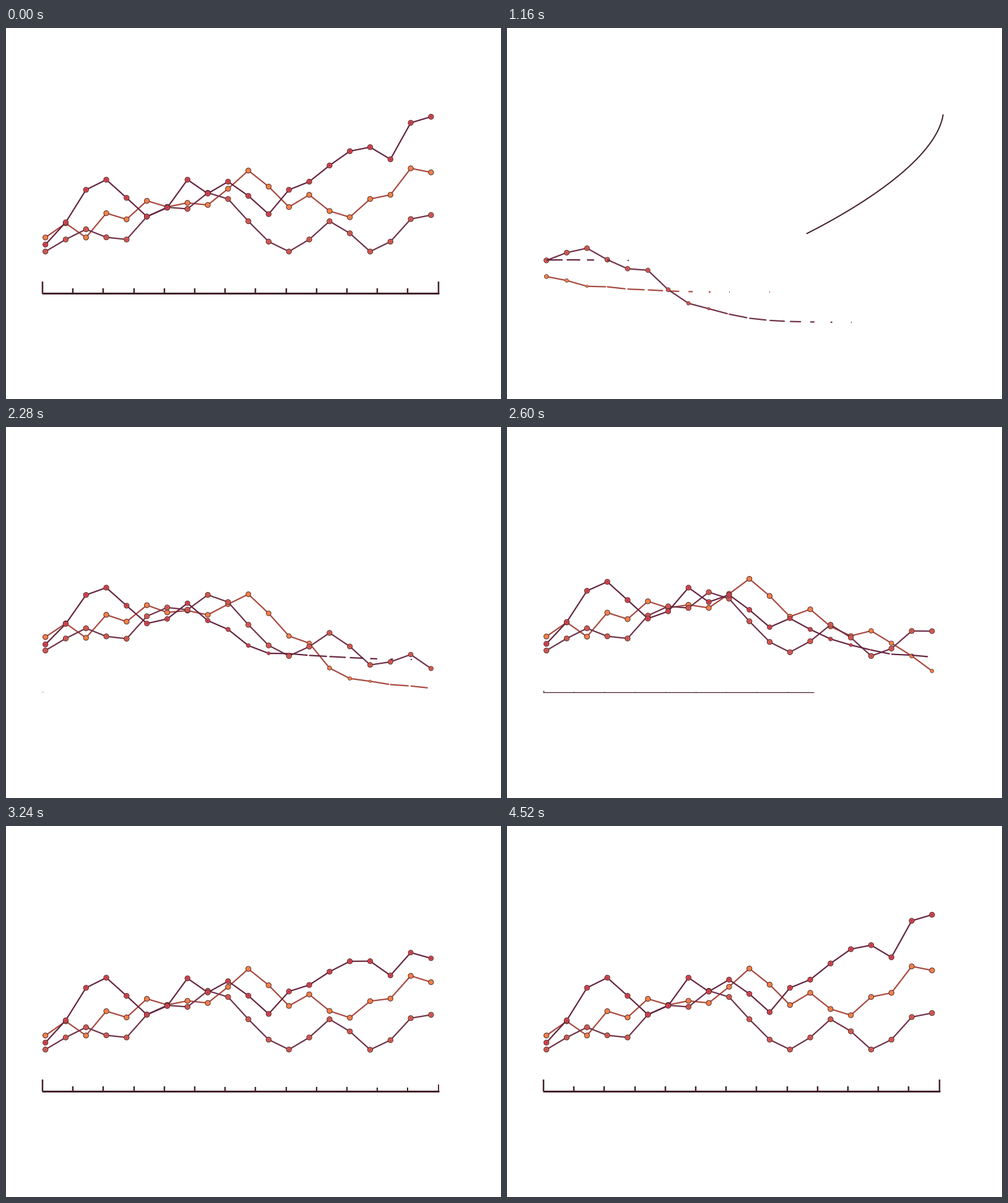
A matplotlib script that plays this animation: 800 px wide and 600 px high, repeating every 5520 ms.

```python
import numpy as np
import matplotlib.pyplot as plt
from matplotlib.animation import FuncAnimation
from matplotlib.collections import LineCollection

W, H, DPI = 800, 600, 100
STEP, FRAMES = 40, 138
PX = 72 / DPI
DARK = "#44222b"

fig = plt.figure(figsize=(W / DPI, H / DPI), dpi=DPI, facecolor="white")
ax = fig.add_axes([0, 0, 1, 1])
ax.set_xlim(0, W)
ax.set_ylim(H, 0)
ax.axis("off")

# Ease curve: cubic bezier (.64, 0, 0, 1)
_s = np.linspace(0, 1, 800)
_ease_x = 1.92 * _s * (1 - _s) ** 2 + _s ** 3
_ease_y = 3 * _s ** 2 - 2 * _s ** 3


def ease(t, start, dur):
    return np.interp((t - start) / dur, _ease_x, _ease_y)


class Series:
    """A row of points that rise from a base line one after another."""

    def __init__(self, base, values, lag, line, fill, core, z):
        self.base = base
        self.y = np.array(values)
        n = len(values)
        self.x = 63.7 + 32.8 * np.arange(n)
        self.start = 80 * (np.arange(n) + lag) - 40
        self.lines = LineCollection([], colors=line, linewidths=2.2 * PX,
                                    capstyle="butt", zorder=z)
        ax.add_collection(self.lines)
        self.dots = ax.scatter(self.x, self.y, c=fill, edgecolors="#55292c",
                               zorder=z + 0.1)
        self.cores = ax.scatter(self.x, self.y, c=core, linewidths=0,
                                zorder=z + 0.2)

    def update(self, t):
        y = self.base + (self.y - self.base) * ease(t, self.start, 2200)
        pts = np.column_stack([self.x, y])
        grow = ease(t, self.start - 208, 1200)[:-1, None]
        ends = pts[:-1] + (pts[1:] - pts[:-1]) * grow
        shown = grow[:, 0] > 0
        self.lines.set_segments(np.stack([pts[:-1], ends], axis=1)[shown])
        scale = ease(t, self.start + 32, 1440)
        self.dots.set_offsets(pts)
        self.dots.set_sizes((8.2 * scale * PX) ** 2)
        self.dots.set_linewidths(scale * PX)
        self.cores.set_offsets(pts)
        self.cores.set_sizes((3.6 * scale * PX) ** 2)


class Axis:
    """Base line with brackets at both ends and small ticks between."""

    def __init__(self):
        self.x = 59 + 49.2 * np.arange(14)
        self.height = np.full(14, 7.5)
        self.height[[0, -1]] = 18.5
        self.start = 2260 + 40 * np.arange(14)
        self.line, = ax.plot([], [], color=DARK, solid_capstyle="butt")
        self.ticks = LineCollection([], colors=DARK, capstyle="butt")
        ax.add_collection(self.ticks)

    def update(self, t):
        p = ease(t, 2270, 800)
        self.line.set_data([58, 58 + 642 * p], [428.5, 428.5])
        self.line.set_linewidth((1 + 2 * ease(t, 2380, 800)) * PX)
        self.line.set_visible(p > 0)
        k = ease(t, self.start, 1200)
        on = k > 0
        foot = np.column_stack([self.x, np.full(14, 428.5)])
        top = foot - np.column_stack([np.zeros(14), self.height * k])
        self.ticks.set_segments(np.stack([foot, top], axis=1)[on])
        self.ticks.set_linewidths((1 + 1.5 * k[on]) * PX if on.any() else 0)


class Swoosh:
    """A rising curve that draws itself and is then wiped from its tail."""

    def __init__(self):
        u = np.linspace(0, 1, 500)[:, None]
        p0, p1, p2, p3 = map(np.array, [(59, 476), (330, 430), (698, 258), (705.5, 134)])
        self.pts = ((1 - u) ** 3 * p0 + 3 * u * (1 - u) ** 2 * p1
                    + 3 * u ** 2 * (1 - u) * p2 + u ** 3 * p3)
        run = np.hypot(*np.diff(self.pts, axis=0).T).cumsum()
        self.frac = np.r_[0, run / run[-1]]
        self.line, = ax.plot([], [], color=DARK, lw=2 * PX,
                             solid_capstyle="butt", zorder=1)

    def update(self, t):
        head, tail = ease(t, -214, 1600), ease(t, 852, 800)
        if head - tail < 1e-4:
            self.line.set_data([], [])
            return
        f = np.linspace(tail, head, 200)
        self.line.set_data(np.interp(f, self.frac, self.pts[:, 0]),
                           np.interp(f, self.frac, self.pts[:, 1]))


low = [361.5, 342, 325.5, 338.5, 342, 305, 290, 292.5, 266.5, 276.5,
       312.5, 345.5, 361.5, 342, 312.5, 332, 361.5, 345.5, 309, 302.5]
mid = [338.8, 315.8, 338.8, 299.5, 309.5, 279.5, 289.3, 282.8, 286.2, 260,
       230.5, 256.5, 289.5, 269.8, 296, 306, 276.5, 269.8, 227, 233.5]
high = [350.3, 314.3, 261.7, 245.3, 274.7, 305, 290.7, 245.3, 267.8, 248.5,
        271.5, 301, 261.7, 248.5, 222.3, 199.2, 192.7, 212.3, 153.3, 143.5]

parts = [
    Swoosh(),
    Axis(),
    Series(427, mid, 6, "#a8483f", "#f5854a", "#ee7e45", 3),
    Series(476, low, 0, "#6f3148", "#dc6152", "#c14f55", 4),
    Series(376, high, 10.5, "#64243f", "#e04a50", "#ae3a4c", 5),
]


def draw(n):
    # The loop opens on the finished chart
    t = n * STEP if n else FRAMES * STEP
    for part in parts:
        part.update(t)
    return []


anim = FuncAnimation(fig, draw, frames=FRAMES, init_func=lambda: draw(0),
                     interval=STEP, repeat=True, repeat_delay=0, blit=False)
plt.show()
```
